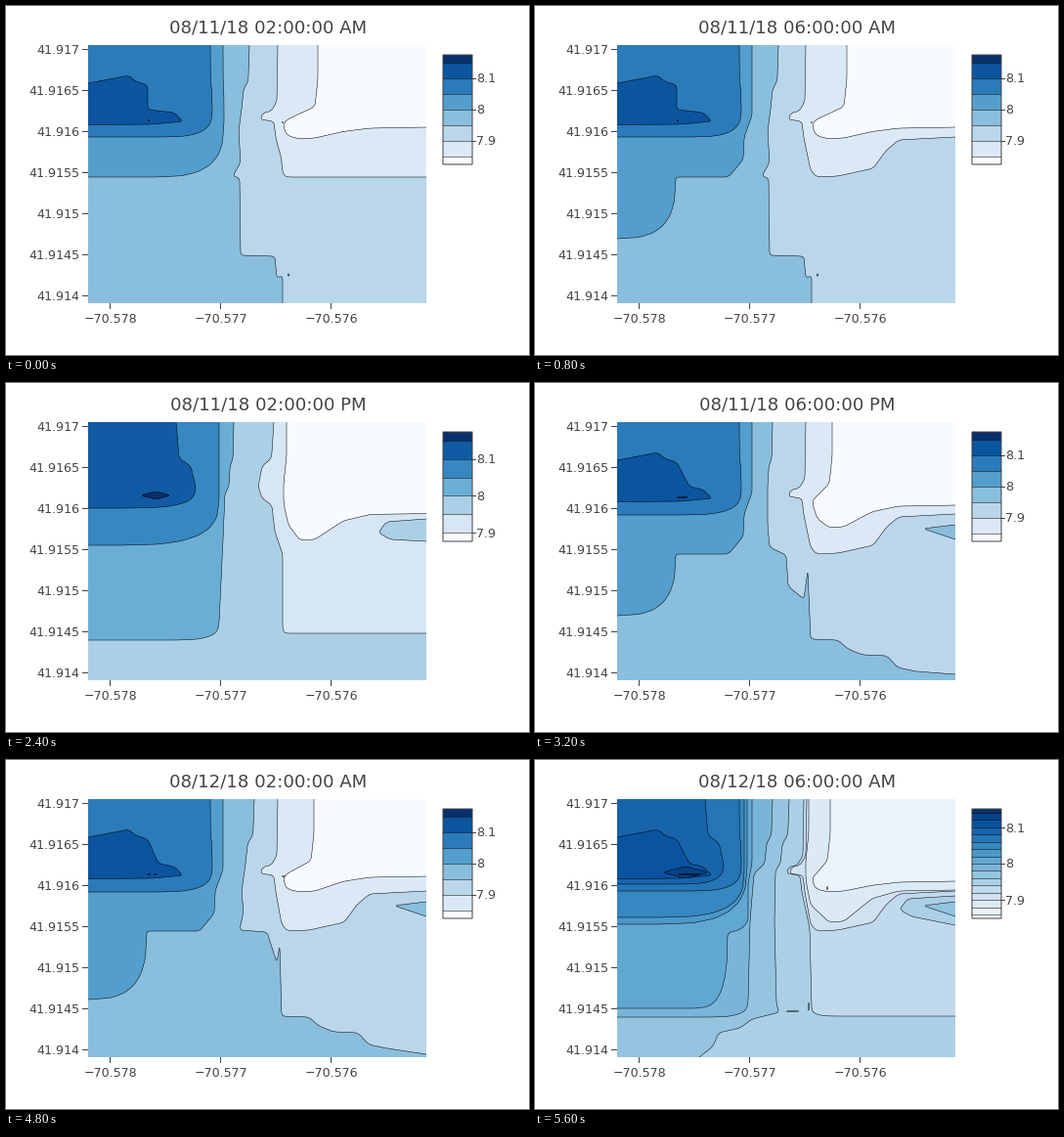
Animation, 535 px wide and 357 px high, one loop 6.4 s. Source, as a matplotlib script:

```python
import numpy as np
import matplotlib.pyplot as plt
from matplotlib.animation import ArtistAnimation
from matplotlib.patches import PathPatch, Rectangle
from matplotlib.path import Path

W, H, DPI = 535, 357, 100
LEFT, TOP, RIGHT, BOTTOM = 84, 40, 430, 304
BAR_X, BAR_TOP, BAR_W, BAR_H = 447, 50, 30, 112
INK = "#444444"
PX = 72 / DPI

plt.rcParams["font.family"] = "DejaVu Sans"
fig = plt.figure(figsize=(W / DPI, H / DPI), dpi=DPI, facecolor="white")
ax = fig.add_axes([0, 0, 1, 1])
ax.set(xlim=(0, W), ylim=(H, 0))
ax.axis("off")


# Building blocks of the contours

def run(x, shift):
    """Fall from the top edge, sliding sideways about a third of the way down."""
    return [(x, TOP), (x + 0.15 * shift, 77), (x + 0.75 * shift, 85), (x + shift, 106)]


def bend(x, y, a, h):
    """Turn a fall at x into a row at y: left for a > 0, right for a < 0."""
    t = np.linspace(0, np.pi / 2, 7)
    arc = zip(x - a * (1 - np.cos(t) ** 0.7), y - h * (1 - np.sin(t) ** 0.7))
    return [*arc, (LEFT if a > 0 else RIGHT, y)]


def west(x, shift, y, a, h):
    return run(x, shift) + bend(x + shift, y, a, h)


def neck(x):
    """Fall from the top edge with a short spike to the left."""
    return [(x, TOP), (x - 1, 98), (x - 7, 108), (x - 15, 109), (x - 18, 116),
            (x - 4, 118), (x - 2, 135)]


def basin(x, dip, y):
    """Fall from the top edge into a dip, then climb to the right edge."""
    throat = min(x - 3, 284)
    return [(x, TOP), (x, 75), (x - 3, 103), (min(x - 3, 288), 116), (throat, 120),
            (throat + 1, 128), (throat + 5, (130 + dip) / 2), (301, dip),
            (316, dip - 1), (345, y + 2 + 0.2 * (dip - y)), (372, y + 1), (RIGHT, y)]


def ledge(x):
    return neck(x) + [(282, 168), (288, 175), (310, 174), (346, 166), (359, 148),
                      (372, 137), (RIGHT, 134)]


def stairs(y):
    return [(282, 262), (310, 263), (320, 272), (335, 278), (360, 279), (371, 291),
            (390, 295), (RIGHT, y)]


def notch(y):
    return run(222, 0) + [(222, 112), (214, 134), (213, 157), (198, 175),
                          (145, 175)] + bend(144, y, 60, y - 176)


def plateau(x):
    return [(LEFT, 79), (126, 71), (132, 77), (145, 81), (x, 106), (172, 109),
            (181, 118), (150, 121), (LEFT, 121.5)]


def lens(x, y):
    return [(RIGHT, y), (x + 12, 160), (x, 153), (x + 8, 142), (RIGHT, 139)]


def speck(x, y, w, h):
    return [(x - w, y), (x, y - h), (x + w, y), (x, y + h)]


WEDGE = [(RIGHT, 160), (397, 149), (RIGHT, 145)]

# Contours by colour step. A curve that starts on the border is closed
# clockwise along it; any other curve is a loop.
NIGHT = {
    1: [basin(319, 136, 124), speck(283, 119, 1, 0.5)],
    2: [neck(278) + bend(282, 175, -8, 18)],
    3: [run(249, -8) + [(238, 128), (240, 160), (232, 174), (239, 176), (240, 255),
                        (275, 256), (277, 278), (283, 276), (283, BOTTOM)],
        speck(289, 275, 1, 1.5)],
    4: [west(222, 1, 175, 70, 55)],
    5: [west(209, 2, 134, 50, 26)],
    6: [plateau(145)],
    7: [speck(146, 117, 1, 1)],
}
MORNING = {
    1: [basin(302, 145, 125)],
    2: [neck(278) + [(282, 174), (295, 176), (301, 237), (309, 236), (317, 210),
                     (338, 175), (RIGHT, 175)],
        lens(373, 163)],
    3: [run(243, -4) + [(237, 124), (225, 173), (224, 255), (211, 264), (172, 275),
                        (148, 279), (145, 291), (105, BOTTOM)]],
    4: [west(222, -1, 171, 90, 50)],
    5: [west(195, 12, 134, 52, 24)],
    6: [[(LEFT, 109), (160, 109), (180, 116), (150, 119), (LEFT, 118)]],
}
AFTERNOON = {
    1: [basin(287, 161, 133.5)],
    2: [run(274, -16) + [(262, 118), (272, 125), (275, 152), (283, 175)]
        + bend(283, 256, -5, 10),
        lens(381, 162)],
    3: [run(233, -5) + [(224, 113), (222, 160)] + bend(218, 263, 45, 18)],
    4: [west(218, 0, 166, 100, 46)],
    5: [west(174, 20, 128, 70, 20)],
    6: [speck(153, 115, 16, 4)],
}
EVENING = {
    1: [basin(304, 148, 125)],
    2: [ledge(277)],
    3: [run(243, -5) + [(238, 145), (240, 168), (257, 176), (259, 208), (275, 221),
                        (279, 192)] + stairs(298),
        WEDGE],
    4: [notch(238)],
    5: [west(209, 2, 135, 60, 24)],
    6: [plateau(158)],
    7: [speck(151, 117, 7, 0.7)],
}
NEXT_NIGHT = {
    1: [basin(315, 135, 119), speck(284, 119, 2, 0.5)],
    2: [ledge(278)],
    3: [run(254, -9) + [(241, 135), (243, 155), (239, 174), (267, 176), (277, 207),
                        (280, 190)] + stairs(301),
        WEDGE],
    4: [notch(245)],
    5: [west(209, 2, 135, 55, 24)],
    6: [plateau(156)],
    7: [speck(146, 117, 2, 0.5), speck(153, 117, 2, 0.5)],
}
NEXT_DAWN = {
    2: [basin(302, 135, 124), speck(299, 131, 1, 2)],
    3: [basin(280, 166, 133)],
    4: [ledge(278)],
    5: [neck(275) + [(281, 172)] + bend(283, 262, -25, 9),
        lens(373, 169), speck(264, 257, 8, 0.7), speck(280, 252, 0.7, 5)],
    6: [run(260, -9) + [(246, 113), (245, 165), (247, 250), (250, 258), (222, 265),
                        (210, 274), (188, 279), (182, 293), (168, BOTTOM)],
        WEDGE],
    7: [run(243, -8) + [(224, 116), (220, 165)] + bend(218, 263, 40, 16)],
    8: [run(222, 0) + [(218, 126), (218, 165), (211, 173)] + bend(197, 254, 32, 77)],
    9: [west(217, 0, 168, 90, 58)],
    10: [west(214, 0, 161, 85, 45)],
    11: [west(209, 2, 134, 50, 25)],
    12: [west(174, 19, 127, 45, 20)],
    13: [plateau(158)],
    14: [speck(154, 115, 24, 6)],
    15: [speck(158, 117, 13, 1)],
}
DAWN = {**NIGHT, 2: EVENING[2], 4: EVENING[4]}
LATE = {**EVENING, 1: NEXT_NIGHT[1], 3: NEXT_NIGHT[3], 4: NEXT_NIGHT[4]}

# Colour counts, with the colour steps at 7.9, 8 and 8.1.
MID, COARSE, FINE = (8, (2, 4, 6)), (7, (1, 3, 5)), (16, (3, 8, 13))
SCENES = [
    ("08/11/18 02:00:00 AM", NIGHT, MID),
    ("08/11/18 06:00:00 AM", DAWN, MID),
    ("08/11/18 10:00:00 AM", MORNING, COARSE),
    ("08/11/18 02:00:00 PM", AFTERNOON, COARSE),
    ("08/11/18 06:00:00 PM", EVENING, MID),
    ("08/11/18 10:00:00 PM", LATE, MID),
    ("08/12/18 02:00:00 AM", NEXT_NIGHT, MID),
    ("08/12/18 06:00:00 AM", NEXT_DAWN, FINE),
]


def rounded(points, closed, radius=4):
    """Polyline with its corners softened."""
    p = np.array(points, float)
    if closed:
        middle = (p[0] + p[-1]) / 2
        p = np.vstack([middle, p, middle])
    verts, codes = [p[0]], [Path.MOVETO]
    for a, b, c in zip(p, p[1:], p[2:]):
        sides = []
        for d in (a - b, c - b):
            size = max(np.hypot(*d), 1e-9)
            sides.append(b + d * min(radius / size, 0.5))
        verts += [sides[0], b, sides[1]]
        codes += [Path.LINETO, Path.CURVE3, Path.CURVE3]
    return verts + [p[-1]], codes + [Path.LINETO]


def border_pos(point):
    """Clockwise distance along the border from the top left, or None."""
    x, y = point
    w, h = RIGHT - LEFT, BOTTOM - TOP
    if y == TOP:
        return x - LEFT
    if x == RIGHT:
        return w + y - TOP
    if y == BOTTOM:
        return w + h + RIGHT - x
    if x == LEFT:
        return 2 * w + h + BOTTOM - y
    return None


def corners_between(start, end):
    corners = [(LEFT, TOP), (RIGHT, TOP), (RIGHT, BOTTOM), (LEFT, BOTTOM)]
    lap = 2 * (RIGHT - LEFT + BOTTOM - TOP)
    a, b = border_pos(start), border_pos(end)
    b += lap * (b < a)
    return [c for turn in (0, lap) for c in corners
            if a < border_pos(c) + turn < b]


def rect(x, y, w, h, **style):
    return ax.add_patch(Rectangle((x, y), w, h, snap=False, **style))


def label(x, y, text, size=12.6, ha="center"):
    return ax.text(x, y, text, fontsize=size * PX, color=INK, ha=ha, va="baseline")


def segment(xs, ys, color=INK, width=1.0):
    return ax.plot(xs, ys, color=color, lw=width * PX, solid_capstyle="butt",
                   snap=False)[0]


def contour(points, color, frame):
    closed = border_pos(points[0]) is None
    verts, codes = rounded(points, closed)
    extra = [] if closed else corners_between(points[-1], points[0])
    area = Path(verts + extra, codes + [Path.LINETO] * len(extra))
    parts = [PathPatch(area, fc=color, ec="none", lw=0),
             PathPatch(Path(verts, codes), fc="none", ec="black", lw=0.5 * PX,
                       snap=False)]
    for part in parts:
        ax.add_patch(part)
        part.set_clip_path(frame)
    return parts


def color_bar(colors, marks):
    n = len(colors)
    step = BAR_H / (n - 1)
    bottom, right = BAR_TOP + BAR_H, BAR_X + BAR_W
    cuts = [round(bottom - step * (k - 0.5)) for k in range(1, n)]
    edges = [bottom] + cuts + [BAR_TOP]
    parts = [rect(BAR_X, hi, BAR_W, lo - hi, fc=c, ec="none", lw=0)
             for c, lo, hi in zip(colors, edges, edges[1:])]
    parts += [segment([BAR_X, right], [y + 0.25] * 2, "black", 0.5) for y in cuts]
    parts.append(rect(BAR_X, BAR_TOP, BAR_W, BAR_H, fc="none", ec=INK, lw=PX))
    for k, text in zip(marks, ("7.9", "8", "8.1")):
        y = edges[k]
        parts += [segment([right, right + 4], [y + 0.5] * 2),
                  label(right + 4, y + 4.5, text, ha="left")]
    return parts


def scene(title, levels, scale):
    n, marks = scale
    colors = [plt.colormaps["Blues"](i / (n - 1)) for i in range(n)]
    base = rect(LEFT, TOP, RIGHT - LEFT, BOTTOM - TOP,
                fc=colors[min(levels) - 1], ec="none", lw=0)
    parts = [base, label(W / 2 + 0.5, 27.2, title, size=18.2)]
    for k in sorted(levels):
        for points in levels[k]:
            parts += contour(points, colors[k], base)
    return parts + color_bar(colors, marks)


for i in range(7):
    y = 44.5 + 42 * i
    segment([LEFT - 6, LEFT], [y, y])
    label(75.5, y + 4.3, f"{41.917 - 0.0005 * i:.4f}".rstrip("0"), ha="right")
for i in range(3):
    x = 106.5 + 113 * i
    segment([x, x], [BOTTOM, BOTTOM + 6])
    label(x, 324.5, f"−{70.578 - 0.001 * i:.3f}")

anim = ArtistAnimation(fig, [scene(*s) for s in SCENES], interval=800,
                       repeat=True, repeat_delay=0)
plt.show()
```
